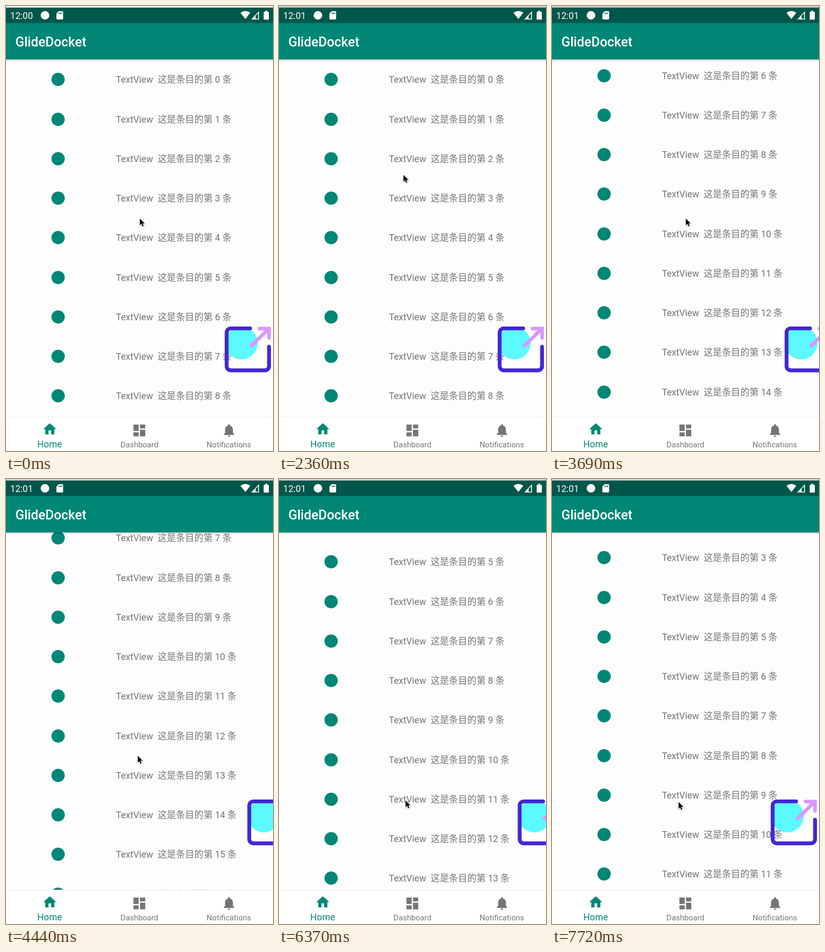
An HTML page with a canvas for the animation above (8000 ms loop, 514 by 858 pixels).

```html
<!DOCTYPE html>
<html lang="zh-CN">
<head>
<meta charset="utf-8">
<title>List with docking button</title>
<style>
  html, body { margin: 0; width: 100%; height: 100%; overflow: hidden; background: #fdfdfd; }
  canvas { display: block; width: 514px; height: 858px; }
</style>
</head>
<body>
<canvas id="stage" width="514" height="858"></canvas>
<script>
const ctx = document.getElementById('stage').getContext('2d');
const W = 514, H = 858, LOOP = 8000, TICK = 148, LAST_TICK = 52;
const TEAL = '#008776', DARK_TEAL = '#00574b', GREY = '#757575';
const FONT = "Roboto, 'Noto Sans CJK SC', 'Noto Sans CJK', sans-serif";
const FIRST_ROW = 141.75, ROW_PITCH = 76.25, LIST_TOP = 103, LIST_BOTTOM = 793;
const DOCK_SHIFT = 43.5;

// A swipe slows down from start to end; the button docks meanwhile and comes back after it.
const SWIPES = [
  { start: 22.8, end: 30, distance: 561.75, power: 4.83, dock: 23.4 },
  { start: 40.6, end: 47, distance: -343, power: 1.84, dock: 40.7 }
];

// Turning points of the pointer: tick, x, y.
const POINTER = [
  [0, 257, 409], [7, 235, 369], [11, 248, 531], [16, 239, 325], [22, 250, 600],
  [25, 257, 409], [30, 253, 533], [39, 256, 362], [40, 256, 362], [43.2, 243, 622]
];

const ICONS = {
  home: 'M10 20v-6h4v6h5v-8h3L12 3 2 12h3v8z',
  dashboard: 'M3 13h8V3H3zM3 21h8v-6H3zM13 21h8V11h-8zM13 3v6h8V3z',
  bell: 'M12 22c1.1 0 2-.9 2-2h-4c0 1.1.9 2 2 2zm6-6v-5c0-3.1-1.6-5.6-4.5-6.3V4' +
        'a1.5 1.5 0 0 0-3 0v.7C7.6 5.4 6 7.9 6 11v5l-2 2v1h16v-1z',
  wifi: 'M0 3Q9.5-4 19 3L9.5 15z',
  card: 'M4.5 0H11q2 0 2 2V14q0 2-2 2H2q-2 0-2-2V4.5zM4.5 2.5v3H6v-3zM7 2.5v3h1.5v-3zM9.5 2.5v3H11v-3z',
  signal: 'M15 0V16H0zM13.4 4L8.5 9v5.4h4.9z',
  battery: 'M3 0h4v2h2q1 0 1 1V16q0 1-1 1H1q-1 0-1-1V3q0-1 1-1h2z',
  pointer: 'M0 0V14L3.2 11.1 5.4 16.2 7.7 15.2 5.5 10.3H10z'
};
for (const name in ICONS) ICONS[name] = new Path2D(ICONS[name]);

const ramp = (t, from, to) => Math.min(1, Math.max(0, (t - from) / (to - from)));
const smooth = u => u * u * (3 - 2 * u);
const sum = (list, fn) => list.reduce((total, item) => total + fn(item), 0);

const scrollAt = tick =>
  sum(SWIPES, s => s.distance * (1 - (1 - ramp(tick, s.start, s.end)) ** s.power));

const dockAt = tick => DOCK_SHIFT *
  sum(SWIPES, s => ramp(tick, s.dock, s.dock + 2.6) - ramp(tick, s.end, s.end + 3));

function pointerAt(tick) {
  let [, x, y] = POINTER[0];
  for (let i = 1; i < POINTER.length; i++) {
    const [from, x0, y0] = POINTER[i - 1], [to, x1, y1] = POINTER[i];
    const f = smooth(ramp(tick, from, to));
    x += (x1 - x0) * f;
    y += (y1 - y0) * f;
  }
  return [Math.round(x), Math.round(y)];
}

function rect(x, y, w, h, color) {
  ctx.fillStyle = color;
  ctx.fillRect(x, y, w, h);
}

function disc(x, y, r, color) {
  ctx.fillStyle = color;
  ctx.beginPath();
  ctx.arc(x, y, r, 0, Math.PI * 2);
  ctx.fill();
}

function text(str, x, y, size, color, align = 'left', weight = 400) {
  ctx.font = `${weight} ${size}px ${FONT}`;
  ctx.fillStyle = color;
  ctx.textAlign = align;
  ctx.fillText(str, x, y);
}

function icon(name, x, y, color, scale = 1) {
  ctx.save();
  ctx.translate(x, y);
  ctx.scale(scale, scale);
  ctx.fillStyle = color;
  ctx.fill(ICONS[name], 'evenodd');
  ctx.restore();
}

function drawList(scroll) {
  ctx.save();
  ctx.beginPath();
  ctx.rect(0, LIST_TOP, W, LIST_BOTTOM - LIST_TOP);
  ctx.clip();
  const first = Math.max(0, Math.floor((scroll - 60) / ROW_PITCH));
  for (let i = first; i < first + 12; i++) {
    const y = Math.floor(FIRST_ROW + i * ROW_PITCH - scroll);
    disc(100.3, y + 0.5, 12.8, TEAL);
    text(`TextView  这是条目的第 ${i} 条`, 211.5, y + 7, 17.65, GREY);
  }
  ctx.restore();
}

function drawShareButton(dx) {
  ctx.save();
  ctx.translate(dx, 0);
  disc(453, 650, 31.5, '#5cfaff');
  ctx.lineWidth = 7.4;
  ctx.lineCap = 'round';

  ctx.strokeStyle = '#4228d4';
  ctx.beginPath();
  ctx.moveTo(470, 621.6);
  ctx.arcTo(424.8, 621.6, 424.8, 702.5, 8);
  ctx.arcTo(424.8, 702.5, 506.4, 702.5, 8);
  ctx.arcTo(506.4, 702.5, 506.4, 657, 8);
  ctx.lineTo(506.4, 657);
  ctx.stroke();

  ctx.strokeStyle = '#d996ff';
  ctx.lineWidth = 6.8;
  ctx.beginPath();
  ctx.moveTo(472.5, 655);
  ctx.lineTo(504, 624);
  ctx.moveTo(488, 622);
  ctx.lineTo(506.4, 622);
  ctx.lineTo(506.4, 640);
  ctx.stroke();
  ctx.restore();
}

function drawHeader(clock, edge) {
  rect(0, 0, W, 3, edge);
  rect(0, 3, W, 30, DARK_TEAL);
  rect(0, 33, W, 70, TEAL);
  const shadow = ctx.createLinearGradient(0, 103, 0, 107);
  shadow.addColorStop(0, 'rgba(0,0,0,.2)');
  shadow.addColorStop(1, 'rgba(0,0,0,0)');
  rect(0, 103, W, 4, shadow);

  text(clock, 8, 25, 17.65, '#fff');
  disc(75, 18, 8.3, '#fff');
  icon('card', 97, 10, '#fff');
  icon('wifi', 451.3, 10, '#fff');
  icon('signal', 472, 10, '#fff');
  icon('battery', 496, 9.3, '#fff');
  text('GlideDocket', 18, 78, 25.2, '#fff', 'left', 500);
}

function drawNav() {
  rect(0, 792, W, 1, '#ececec');
  rect(0, 793, W, H - 793, '#fff');
  icon('home', 69.2, 800.7, TEAL, 1.26);
  icon('dashboard', 241.6, 803.2, GREY, 1.26);
  icon('bell', 414.2, 803, GREY, 1.26);
  text('Home', 84, 851, 17.65, TEAL, 'center');
  text('Dashboard', 256.8, 851, 15.1, GREY, 'center');
  text('Notifications', 429, 851, 15.1, GREY, 'center');
}

function drawPointer([x, y]) {
  ctx.save();
  ctx.translate(x + 0.7, y + 0.7);
  ctx.scale(0.93, 0.93);
  ctx.shadowColor = 'rgba(0,0,0,.35)';
  ctx.shadowBlur = 2;
  ctx.shadowOffsetY = 1;
  ctx.strokeStyle = '#fff';
  ctx.lineWidth = 2;
  ctx.lineJoin = 'round';
  ctx.stroke(ICONS.pointer);
  ctx.shadowColor = 'transparent';
  ctx.fillStyle = '#000';
  ctx.fill(ICONS.pointer);
  ctx.restore();
}

function draw(time) {
  // The screen updates in discrete steps and rests at the end of the loop.
  const tick = Math.min(LAST_TICK, Math.floor((time % LOOP + 16) / TICK));
  rect(0, 0, W, H, '#fdfdfd');
  drawList(scrollAt(tick));
  drawShareButton(dockAt(tick));
  drawHeader(tick < 11 ? '12:00' : '12:01', tick < 8 ? '#fff' : '#d0d0d0');
  drawNav();
  drawPointer(pointerAt(tick));
}

const start = performance.now();
function loop() {
  draw(performance.now() - start);
  requestAnimationFrame(loop);
}
loop();
</script>
</body>
</html>
```
